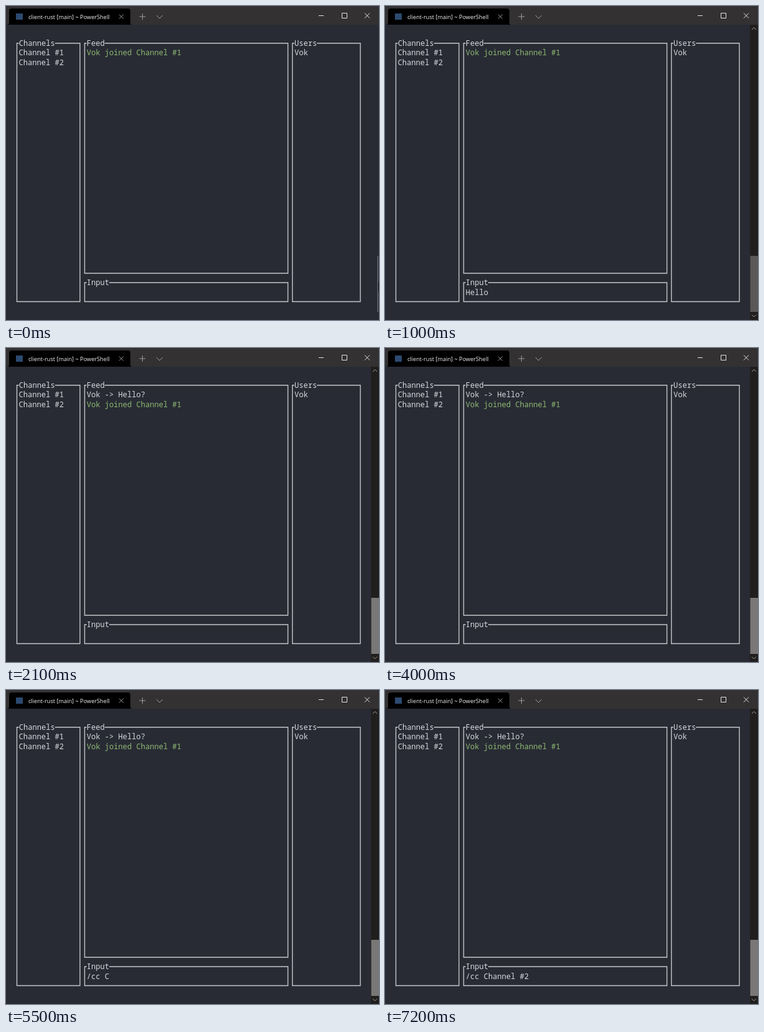
Recreate the animation shown at these times as an HTML page. Size 600x504 px, loop 8000 ms.

```html
<!DOCTYPE html>
<html lang="en">
<head>
<meta charset="utf-8">
<title>Terminal chat</title>
<style>
  html, body { margin: 0; width: 100%; height: 100%; overflow: hidden; background: #282b34; }
  svg { display: block; width: 600px; height: 504px; }
  .mono text { font: 500 12.1px "Noto Sans Mono", monospace; fill: #d6d9de; white-space: pre; }
  .mono .notice { fill: #8fba73; }
  .tab-title { font: 9.2px "Open Sans", sans-serif; fill: #f2f2f2; }
  .stroke { fill: none; stroke: #c4c6ca; stroke-width: 1.4; }
  .icon { fill: none; stroke: #e4e4e4; stroke-width: 1; }
  .dim { stroke: #a09e9d; }
</style>
</head>
<body>
<svg viewBox="0 0 600 504">
  <rect width="600" height="504" fill="#282b34"/>
  <rect width="600" height="30" fill="#333132"/>
  <path d="M2 30Q5 30 5 26V8Q5 4 9 4H196Q200 4 200 8V26Q200 30 203 30Z" fill="#000"/>
  <rect x="16" y="12" width="11" height="10" fill="#2c4a70"/>
  <text class="tab-title" x="36" y="20.5">client-rust [main] ~ PowerShell</text>
  <path class="icon dim" d="M182 13.5l7 7m0-7l-7 7M214.5 17h10M219.5 12v10M242 15l5 5 5-5"/>
  <path class="icon" d="M503 15.5h8M540.5 11.5h8v8h-8zM577 11.5l8 8m0-8l-8 8"/>

  <g id="thin-bar">
    <rect x="597" y="401" width="2" height="90" fill="#55575d"/>
    <rect x="599" y="443" width="1" height="15" fill="#000"/>
  </g>
  <g id="wide-bar">
    <rect x="587" y="30" width="13" height="474" fill="#211f1d"/>
    <rect id="thumb" x="587.5" y="401" width="12.5" height="90"/>
    <path class="icon dim" d="M590 38l3.5-3.5 3.5 3.5M590 495.500l3.500 3.500 3.500-3.500"/>
  </g>

  <g id="panels" class="mono"></g>
  <g class="mono">
    <text x="20.5" y="79.400">Channel #1</text>
    <text x="20.5" y="94.800">Channel #2</text>
    <text x="464" y="79.400">Vok</text>
    <text id="message" x="129.700" y="79.400">Vok -&gt; Hello?</text>
    <text id="notice" class="notice" x="129.700">Vok joined Channel #1</text>
    <text id="input" x="129.700" y="464"></text>
  </g>
</svg>
<script>
  const LOOP = 8000, SENT = 1500, CELL = 7.26;
  const byId = id => document.getElementById(id);

  const panels = [
    ['Channels', 17.5, 119, 59.7, 474.5],
    ['Feed', 126.5, 453.5, 59.7, 429],
    ['Input', 126.5, 453.5, 444, 474.5],
    ['Users', 460.7, 570, 59.7, 474.5]
  ];
  byId('panels').innerHTML = panels.map(([title, left, right, top, bottom]) => {
    const textX = left + 3.2;
    const gapEnd = textX + title.length * CELL;
    return `<path class="stroke" d="M${textX} ${top}H${left}V${bottom}H${right}V${top}H${gapEnd}"/>
      <text x="${textX}" y="${top + 4.3}">${title}</text>`;
  }).join('');

  // Key press times, one per visible or blank character.
  const lines = [
    { text: 'Hello?', keys: [400, 500, 600, 800, 1000, 1400], end: SENT },
    { text: '/cc Channel #2', end: LOOP,
      keys: [4100, 4600, 5000, 5200, 5500, 5600, 5800, 6000, 6200, 6300, 6500, 6700, 6900, 7100] }
  ];

  const typedAt = t => {
    const line = lines.find(l => t < l.end && t >= l.keys[0]);
    return line ? line.text.slice(0, line.keys.filter(k => k <= t).length) : '';
  };

  const show = (id, on) => byId(id).setAttribute('visibility', on ? 'visible' : 'hidden');
  const mix = (a, b, p) => Math.round(a + (b - a) * p);

  function draw(now) {
    const t = now % LOOP;
    const hover = Math.min(1, Math.max(0, (Math.floor(t / 100) - 9) / 3));
    const typed = typedAt(t);
    if (byId('input').textContent !== typed) byId('input').textContent = typed;
    show('thin-bar', t < 400);
    show('wide-bar', t >= 400);
    show('message', t >= SENT);
    byId('notice').setAttribute('y', t < SENT ? 79.4 : 94.8);
    byId('thumb').setAttribute('fill', `rgb(${mix(76, 122, hover)},${mix(74, 120, hover)},${mix(72, 118, hover)})`);
  }

  function tick() {
    draw(performance.now());
    requestAnimationFrame(tick);
  }
  tick();
</script>
</body>
</html>
```
